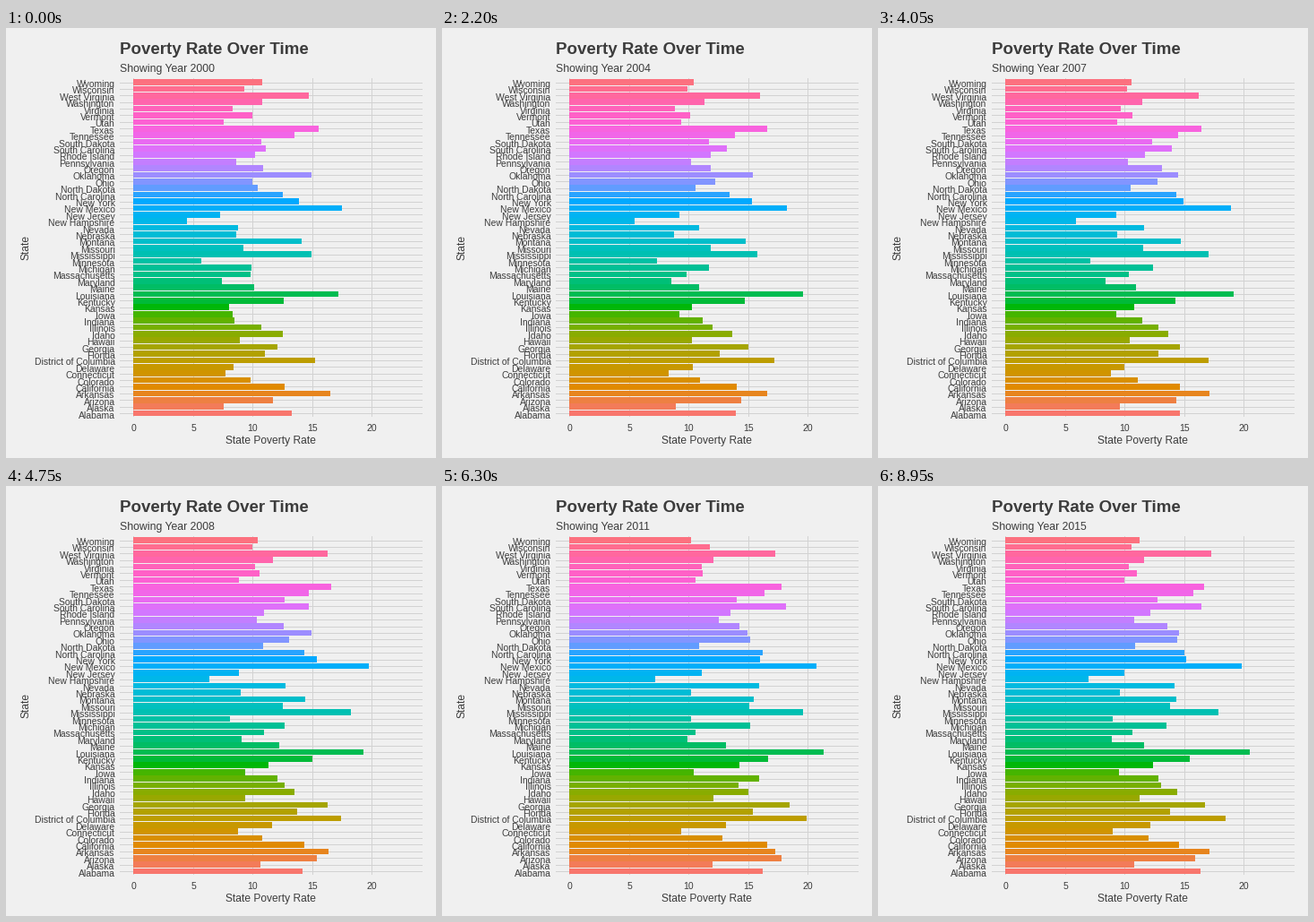
A matplotlib script that plays this animation: 480x480 px, repeating every 9 s.

```python
import numpy as np
import matplotlib.pyplot as plt
from matplotlib.animation import FuncAnimation
from matplotlib.collections import PolyCollection

SIZE, FRAMES, STEP = 480, 180, 50
PAPER, GRID, INK = "#F0F0F0", "#D2D2D2", "#3C3C3C"
LEFT, RIGHT, TOP, BOTTOM = 127, 465, 56.075, 434.475
ZERO, UNIT = 142.36, 13.3

# Rate at the start and at the 2011 high; rules below fill in the other years
states = {
    "Alabama": (13.3, 16.2), "Alaska": (7.6, 12), "Arizona": (11.7, 17.8),
    "Arkansas": (16.5, 17.3), "California": (12.7, 16.6), "Colorado": (9.8, 12.8),
    "Connecticut": (7.7, 9.4), "Delaware": (8.4, 13.1),
    "District of Columbia": (15.2, 19.9), "Florida": (11, 15.4), "Georgia": (12.1, 18.5),
    "Hawaii": (8.9, 12.1), "Idaho": (12.5, 15), "Illinois": (10.7, 14.2),
    "Indiana": (8.5, 15.9), "Iowa": (8.3, 10.4), "Kansas": (8, 14.3),
    "Kentucky": (12.6, 16.7), "Louisiana": (17.2, 21.3), "Maine": (10.1, 13.1),
    "Maryland": (7.4, 9.9), "Massachusetts": (9.8, 10.6), "Michigan": (9.9, 15.2),
    "Minnesota": (5.7, 10.2), "Mississippi": (14.9, 19.6), "Missouri": (9.2, 15.1),
    "Montana": (14.1, 15.5), "Nebraska": (8.6, 10.2), "Nevada": (8.8, 15.9),
    "New Hampshire": (4.5, 7.2), "New Jersey": (7.3, 11.1), "New Mexico": (17.5, 20.7),
    "New York": (13.9, 16), "North Carolina": (12.5, 16.2), "North Dakota": (10.4, 10.9),
    "Ohio": (10, 15.2), "Oklahoma": (14.9, 14.9), "Oregon": (10.9, 14.3),
    "Pennsylvania": (8.6, 12.5), "Rhode Island": (10.2, 13.5),
    "South Carolina": (11.1, 18.2), "South Dakota": (10.7, 14), "Tennessee": (13.5, 16.4),
    "Texas": (15.5, 17.8), "Utah": (7.6, 10.6), "Vermont": (10, 11.2),
    "Virginia": (8.3, 11.1), "Washington": (10.8, 12.1), "West Virginia": (14.7, 17.3),
    "Wisconsin": (9.3, 11.8), "Wyoming": (10.8, 10.2),
}
N = len(states)
start, high = np.array(list(states.values())).T

# Share of the rise reached by year, plus a small wobble that turns at each new year
years = np.arange(FRAMES) * 15 / (FRAMES - 1)
rise = np.interp(years, [0, 4, 6, 8, 10.5, 13, 15], [0, 0.4, 0.4, 0.55, 1, 0.95, 0.7])
wobble = np.random.default_rng(4).normal(0, 0.45, (N, 16))
wobble[:, [0, 10, 11]] = 0
rates = start[:, None] + (high - start)[:, None] * rise
rates += [np.interp(years, np.arange(16), w) for w in wobble]


def hcl(hue, chroma=100, lum=65):
    """Polar LUV colour to clipped sRGB."""
    a = np.radians(hue)
    y = ((lum + 16) / 116) ** 3
    u = chroma * np.cos(a) / (13 * lum) + 0.1978398
    v = chroma * np.sin(a) / (13 * lum) + 0.4683363
    x = 9 * y * u / (4 * v)
    z = -x / 3 - 5 * y + 3 * y / v
    lin = np.array([3.240479 * x - 1.537150 * y - 0.498535 * z,
                    -0.969256 * x + 1.875992 * y + 0.041556 * z,
                    0.055648 * x - 0.204043 * y + 1.057311 * z])
    lin = np.clip(lin, 0, 1)
    return np.where(lin > 0.00304, 1.055 * lin ** (1 / 2.4) - 0.055, 12.92 * lin)


def box(x0, y0, x1, y1):
    return [(x0, y0), (x1, y0), (x1, y1), (x0, y1)]


plt.rcParams["font.family"] = "Liberation Sans"
fig = plt.figure(figsize=(SIZE / 72, SIZE / 72), dpi=72, facecolor=PAPER)
ax = fig.add_axes([0, 0, 1, 1])
ax.set(xlim=(0, SIZE), ylim=(SIZE, 0))
ax.axis("off")


def label(x, y, s, size, ha="left", **kw):
    return ax.text(x, y, s, fontsize=size, ha=ha, va="baseline", color=INK, **kw)


def blocks(verts, colors, z):
    return ax.add_collection(PolyCollection(
        verts, facecolors=colors, edgecolors="none", linewidths=0,
        antialiaseds=False, zorder=z), autolim=False)


row = (BOTTOM - TOP) / (N + 0.2)
mids = BOTTOM - row * (0.6 + np.arange(N))
tops, ends = np.round(mids - 0.45 * row), np.round(mids + 0.45 * row)

ticks = range(0, 25, 5)
tick_x = [round(ZERO + t * UNIT) for t in ticks]
lines = [box(LEFT, round(m), RIGHT, round(m) + 1) for m in mids]
lines += [box(x, round(TOP), x + 1, round(BOTTOM)) for x in tick_x]
blocks(lines, GRID, 1)
bars = blocks([], [hcl(15 + 360 * k / N) for k in range(N)], 2)

label(127, 29, "Poverty Rate Over Time", 18.7, weight="bold")
subtitle = label(127, 49, "", 12.2)
for name, m in zip(states, mids):
    label(121.5, m + 5.5, name, 10.4, "right")
for t, x in zip(ticks, tick_x):
    label(x + 0.3, 449.5, str(t), 10.5, "center")
label(295.5, 464, "State Poverty Rate", 12, "center")
label(26, 245, "State", 12, "center", rotation=90, rotation_mode="anchor")


def draw(i):
    tips = np.round(ZERO + rates[:, i] * UNIT)
    bars.set_verts([box(tick_x[0], a, x, b) for a, x, b in zip(tops, tips, ends)])
    subtitle.set_text(f"Showing Year {round(2000 + years[i])}")
    return bars, subtitle


anim = FuncAnimation(fig, draw, frames=FRAMES, interval=STEP, repeat=True, repeat_delay=0)
plt.show()
```
